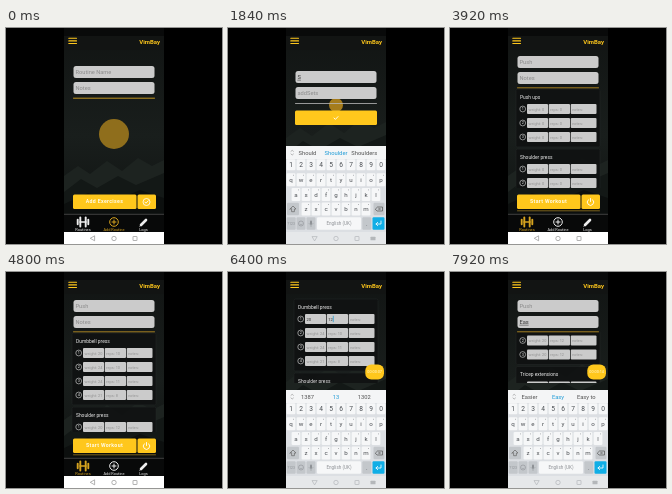
An HTML page that plays this animation: 216 px wide and 216 px high, repeating every 8000 ms.

```html
<!DOCTYPE html>
<html lang="en">
<head>
<meta charset="utf-8">
<title>Workout planner</title>
<style>
html, body { margin: 0; width: 100%; height: 100%; overflow: hidden; background: #000; }
svg { display: block; width: 100vw; height: 100vh; }
text { font-family: Roboto, "DejaVu Sans", sans-serif; }
</style>
</head>
<body>
<svg viewBox="0 0 216 216" xmlns="http://www.w3.org/2000/svg">
  <defs>
    <linearGradient id="sky" x2="0" y2="1">
      <stop offset="0" stop-color="#111413"/>
      <stop offset=".5" stop-color="#191e1c"/>
      <stop offset="1" stop-color="#0d100f"/>
    </linearGradient>
    <clipPath id="phone"><rect x="58" width="100" height="216"/></clipPath>
    <clipPath id="page"><rect x="58" y="22" width="100" height="164"/></clipPath>
    <clipPath id="list"><rect x="58" y="60" width="100" height="100"/></clipPath>
    <clipPath id="shortList"><rect x="58" y="60" width="100" height="51"/></clipPath>
    <clipPath id="raisedList"><rect x="58" y="26" width="100" height="85"/></clipPath>
  </defs>
  <g id="stage" clip-path="url(#phone)"></g>
</svg>
<script>
const LOOP = 8000, STEP = 80;
const GOLD = '#ffc71c', DARK = '#333', BRAND = 'VimBay';
const KEY = '#f6f7f8', SIDE_KEY = '#c3c7cb', BOARD = '#dcdfe3', KEY_INK = '#4a4e52';
const stage = document.getElementById('stage');

const rect = (x, y, w, h, fill, r = 0, more = '') =>
  `<rect x="${x}" y="${y}" width="${w}" height="${h}" rx="${r}" fill="${fill}" ${more}/>`;
const circle = (x, y, r, fill, more = '') =>
  `<circle cx="${x}" cy="${y}" r="${r}" fill="${fill}" ${more}/>`;
const line = (d, color, w = 1) =>
  `<path d="${d}" fill="none" stroke="${color}" stroke-width="${w}" stroke-linecap="round" stroke-linejoin="round"/>`;
// y is the visual middle of the text
const text = (s, x, y, size, fill, anchor = 'middle', more = '') =>
  `<text x="${x}" y="${y + size * 0.36}" font-size="${size}" fill="${fill}" text-anchor="${anchor}" ${more}>${s}</text>`;
const clip = (id, body) => `<g clip-path="url(#${id})">${body}</g>`;
const typed = (s, t, start, perChar) =>
  s.slice(0, Math.max(0, Math.floor((t - start) / perChar) + 1));
const ease = (t, a, b) => {
  const p = Math.min(1, Math.max(0, (t - a) / (b - a)));
  return p * p * (3 - 2 * p);
};
const touch = (x, y) => circle(x, y, 3, '#fff', 'opacity=".65"');

function backdrop(keyboard) {
  const k = keyboard ? -38 : 0;
  return rect(58, 0, 100, 216, 'url(#sky)') +
    `<g transform="translate(0 ${k})">
      <path d="M58 148L72 138 84 146 101 133 116 143 132 130 146 138 158 132V216H58Z" fill="#1d2320"/>
      <path d="M58 164L75 151 91 160 112 148 130 157 158 145V216H58Z" fill="#131816"/>
      <path d="M58 176L82 165 108 173 134 162 158 170V216H58Z" fill="#0c0f0e"/>
    </g>`;
}

function header() {
  return rect(58, 0, 100, 22, '#121413') + rect(58, 0, 100, 8, '#090a0a') +
    [10.3, 12.9, 15.5].map(y => line(`M62.8 ${y}H70.5`, GOLD, 1.1)).join('') +
    text(BRAND, 154, 13.4, 6, GOLD, 'end', 'font-weight="700"');
}

function field(y, value, hint, focus) {
  const width = value.length * 2.85;
  return rect(67.5, y, 81, 12, '#cbcbcb', 2.5) +
    text(value || hint, 69.5, y + 6.2, 5.7, value ? DARK : '#8b8b8b', 'start') +
    (focus && value ? line(`M69.7 ${y + 9.2}h${width}`, DARK, 0.5) : '');
}

const check = (x, y, s, color) =>
  line(`M${x - s} ${y}l${s * 0.7} ${s * 0.7} ${s * 1.3} ${-s * 1.4}`, color, 0.9);

function dumbbell(x, y, color) {
  const plates = [[-5.3, 2.2], [-2.7, 4.6], [2.7, 4.6], [5.3, 2.2]];
  return line(`M${x - 3} ${y}h6`, color, 1.6) +
    plates.map(([dx, h]) => line(`M${x + dx} ${y - h}v${h * 2}`, color, 1.9)).join('');
}

function tabs(active) {
  const tone = i => i === active ? '#d6a31f' : '#eee';
  const mid = tone(1);
  return rect(58, 186, 100, 18, '#080909') + line('M58 186.3H158', '#777', 0.5) +
    dumbbell(77, 194, tone(0)) + text('Routines', 77, 201.3, 4, tone(0)) +
    circle(108, 194, 4.3, 'none', `stroke="${mid}" stroke-width="1"`) +
    line('M106 194h4M108 192v4', mid, 1) +
    text('Add Routine', 108, 201.3, 3.9, mid) +
    line('M135 197L140 192', '#eee', 2.6) + line('M134 198.2l1-1', '#eee', 1) +
    text('Logs', 137.5, 201.3, 4, '#eee');
}

function navbar(keyboard) {
  const ink = keyboard ? '#b4b7ba' : '#929292';
  return rect(58, 204, 100, 12, keyboard ? '#e6e8ea' : '#fff') +
    (keyboard
      ? line('M84.4 208.6h4.8l-2.4 4Z', ink, 0.7)
      : line('M88.6 208.2v4.6l-4-2.3Z', ink, 0.7)) +
    circle(108, 210.5, 2.2, 'none', `stroke="${ink}" stroke-width=".7"`) +
    rect(127, 208.5, 4, 4, 'none', 0.3, `stroke="${ink}" stroke-width=".7"`) +
    (keyboard ? rect(142.5, 208.8, 5, 3.4, ink, 0.5) : '');
}

function actionBar(label, power) {
  const icon = power
    ? line('M138.3 171.8a3.2 3.2 0 1 0 4.4 0M140.5 170.5v3', '#fff', 0.9)
    : circle(140.5, 174, 3.5, 'none', 'stroke="#fff" stroke-width=".8"') + check(140.5, 174, 1.7, '#fff');
  return rect(67, 166.5, 63.5, 14.5, GOLD, 1.5) + rect(131.5, 166.5, 18.5, 14.5, GOLD, 1.5) +
    text(label, 98.5, 173.6, 5.2, '#fffbe8', 'middle', 'font-weight="700" letter-spacing=".35"') + icon;
}

const key = (x, y, w, h, label, size = 6, fill = KEY, ink = KEY_INK) =>
  rect(x - w / 2, y - h / 2, w, h, fill, 1.2) + text(label, x, y, size, ink);

function enterKey(y) {
  return rect(144.5, y - 6.3, 12, 12.6, '#10aee6', 1.2) +
    line(`M153 ${y - 2.5}v3h-5m1.7-1.7l-1.7 1.7 1.7 1.7`, '#fff', 0.8);
}

function backspace(x, y) {
  return rect(x - 5.5, y - 6.2, 11, 12.4, SIDE_KEY, 1.2) +
    line(`M${x - 3.5} ${y}l2-2h5v4h-5Z`, '#555', 0.7) +
    line(`M${x - 0.3} ${y - 0.8}l1.6 1.6m0-1.6l-1.6 1.6`, '#555', 0.6);
}

function symbolBoard() {
  const xs = [64.5, 75.5, 84, 92.5, 101.5, 113, 126, 139, 151.5];
  const rows = ['# £ &amp; _ - 1 2 3 ?', '@ ( ) = + 4 5 6 !', '{&amp;= \' " : % 7 8 9'];
  const widthOf = i => i === 0 ? 11.5 : i < 5 ? 7.8 : i < 8 ? 12 : 11;
  let out = rect(58, 143, 100, 61, BOARD);
  rows.forEach((row, r) => row.split(' ').forEach((k, i) => {
    const side = r === 2 && i === 0;
    out += key(xs[i], 150.5 + r * 15, widthOf(i), 13.4, k, side ? 4 : 6, side ? SIDE_KEY : KEY);
  }));
  out += backspace(151.2, 180.5) + key(64.5, 195.5, 11.5, 13.4, 'ABC', 4, SIDE_KEY) +
    key(75.5, 195.5, 7.8, 13.4, '\'') + key(88.5, 195.5, 16, 13.4, '') +
    line('M84.5 194.5v2h8v-2', '#555', 0.7);
  ['*', ',', '0', '.'].forEach((k, i) => {
    out += key(xs[i + 4], 195.5, widthOf(i + 4), 13.4, k);
  });
  return out + enterKey(195.5);
}

function letterBoard(words) {
  const soft = '#8d9195';
  let out = rect(58, 118, 100, 86, BOARD) + rect(58, 118, 100, 13, '#f4f5f6') +
    line('M63 123.3l1.2-1 1.2 1M63 126l1.2 1 1.2-1', '#888', 0.6);
  words.forEach((w, i) => {
    out += text(w, [79.5, 108, 136.3][i], 124.7, 5.8, i === 1 ? '#1c9ad6' : '#505050');
  });
  const rows = [['1234567890', 63, 136.8], ['qwertyuiop', 63, 151.8], ['asdfghjkl', 68, 166.4], ['zxcvbnm', 78, 181]];
  rows.forEach(([keys, x, y], r) => [...keys].forEach((k, i) => {
    out += key(x + i * 10, y, 8.8, r ? 13 : 11, k, r ? 6.2 : 6.6);
    if (r) out += rect(x + i * 10 + 2, y - 5, 1, 1, '#b2b5b8');
  }));
  out += rect(59, 174.8, 12, 12.4, SIDE_KEY, 1.2) +
    line('M62 181l3-3 3 3h-1.6v2.7h-2.8v-2.7Z', '#666', 0.7) + backspace(151, 181) +
    key(63.2, 195.5, 9, 12.6, '?123', 3.4, SIDE_KEY, soft) + key(73, 195.5, 9, 12.6, '', 6, SIDE_KEY) +
    circle(73, 195.5, 2.5, 'none', `stroke="${soft}" stroke-width=".6"`) +
    line('M71.8 196.2q1.2 1.2 2.4 0', soft, 0.5) +
    key(83, 195.5, 9, 12.6, '', 6, SIDE_KEY) + rect(82, 192.5, 2, 4, soft, 1) +
    line('M81 195.5q2 3 4 0M83 197v1.5', soft, 0.5) +
    key(111, 195.5, 44, 12.6, 'English (UK)', 4.6, KEY, soft) +
    key(138.8, 195.5, 9, 12.6, '.', 6, SIDE_KEY);
  return out + enterKey(195.5);
}

const wordsFor = s =>
  /^\d/.test(s) ? ['1387', '13', '1302'] :
  /^E/.test(s) ? ['Easier', 'Easy', 'Easy to'] :
  /^S/.test(s) ? ['Should', 'Shoulder', 'Shoulders'] :
  /^P/.test(s) ? ['Pushed', 'Push', 'Push up'] : ['I', 'The', 'Thanks'];

const frame = (body, keys, tab) =>
  backdrop(!!keys) + clip('page', body) + header() + (keys || tabs(tab)) + navbar(!!keys);

const mark = y => circle(108, y, 15, '#a57c1c', 'opacity=".85"');

function routineForm({ name = '', keys, exercises = [], tap = '' }) {
  const cards = exercises.map((e, i) => card(74 + i * 60, e, blank(3))).join('');
  return frame(
    (keys ? '' : mark(106)) + field(38, name, 'Routine Name', !!keys) + field(54, '', 'Notes') +
    line('M67.5 70.2H148.5', '#d3a224', 0.9) + clip('list', cards) +
    (keys ? '' : actionBar('Add Exercises', false)) + tap, keys, 1);
}

function exerciseForm({ name, sets = '', keys, onSets, tap = '' }) {
  return frame(
    circle(108, 77, 7, '#a57c1c') + line('M67.5 75.5H148.5', '#b9b9b9', 0.8) +
    field(43, name, 'Exercise Name', !onSets) + field(59, sets, 'addSets', onSets) +
    (sets ? rect(69.5, 61.5, 4.5, 7, '#2b9fd0', 0, 'opacity=".4"') : '') +
    rect(67, 82.5, 82, 14.5, GOLD, 1.5) + check(108, 90, 2, '#fff') + tap, keys);
}

// each row holds [weight, reps, typedWeight, typedReps]
function card(y, title, rows) {
  const cell = (x, w, cy, hint, value) =>
    rect(x, cy - 5, w, 10, '#cbcbcb', 1) +
    text(value || hint, x + 1.5, cy + 0.2, value ? 4.2 : 3.9, value ? DARK : '#939393', 'start');
  return rect(66, y, 84, rows.length * 14 + 16, '#101212', 1.5, 'opacity=".92" stroke="#262928" stroke-width=".5"') +
    text(title, 70, y + 8, 4.9, '#eee', 'start') +
    rows.map(([weight, reps, w, r], i) => {
      const cy = y + 20 + 14 * i;
      return circle(72.7, cy, 2.9, 'none', 'stroke="#ddd" stroke-width=".6"') +
        text(i + 1, 72.7, cy, 3.8, '#eee') +
        cell(77, 21, cy, 'weight: ' + weight, w) +
        cell(98.7, 21.3, cy, 'reps: ' + reps, r) +
        cell(120.7, 25.8, cy, 'notes:', '');
    }).join('');
}

function stack(y, groups) {
  return groups.map(([title, rows]) => {
    const out = card(y, title, rows);
    y += rows.length * 14 + 18;
    return out;
  }).join('');
}

function workout({ groups, scroll = 0, raised, note = '', noteFocus, keys, clock, cursor = '', tap = '' }) {
  const area = raised ? 'raisedList' : keys ? 'shortList' : 'list';
  const fabY = keys ? 92.5 : 148;
  const fields = field(28, '', 'Push') + field(44, note, 'Notes', noteFocus) +
    line('M67.5 59.8H148.5', '#c79722', 0.8);
  return frame(
    clip(area, stack((raised ? 27 : 61) - scroll, groups) + cursor) +
    (raised ? '' : fields) +
    (keys ? '' : actionBar(clock ? 'End Workout' : 'Start Workout', true) +
      line('M67.5 182.8H149.5', '#c79722', 0.6)) +
    (clock ? rect(137.3, fabY, 18.7, 15, GOLD, 6) + text(clock, 146.7, fabY + 7.5, 3.8, '#fff8dc') : '') +
    tap, keys, 0);
}

const blank = n => Array.from({ length: n }, () => [0, 0]);
const newPlan = [['Push ups', blank(3)], ['Shoulder press', blank(3)]];

function pressPlan(t) {
  const rows = [[20, 10], [24, 10], [24, 11], [21, 8]];
  rows[0].push(typed('20', t, 5440, 240), typed('12', t, 6240, 80));
  rows[1].push(typed('24', t, 6720, 80), typed('10', t, 6960, 80));
  const same = (weight, reps) => Array.from({ length: 3 }, () => [weight, reps]);
  return [['Dumbbell press', rows], ['Shoulder press', same(20, 12)], ['Tricep extensions', same(15, 12)]];
}

function scene(t) {
  if (t < 160) return routineForm({});
  if (t < 480) {
    const name = typed('Push', t, 240, 64);
    return routineForm({ name, keys: letterBoard(wordsFor(name)) });
  }
  if (t < 560) return routineForm({ name: 'Push', tap: touch(98, 174) });
  if (t < 1040) {
    const name = typed('Push ups', t, 600, 50);
    return exerciseForm({ name, keys: letterBoard(wordsFor(name)) });
  }
  if (t < 1360) return exerciseForm({
    name: 'Push ups', sets: t < 1120 ? '' : '3', onSets: true, keys: symbolBoard(),
    tap: t >= 1120 && t < 1280 ? touch(81, 87) : ''
  });
  if (t < 1600) return routineForm({ name: 'Push', exercises: ['Push ups'], tap: t >= 1520 ? touch(98, 174) : '' });
  if (t < 2720) {
    const name = typed('Shoulder press', t, 1800, 58);
    return exerciseForm({ name, keys: letterBoard(wordsFor(name)) });
  }
  if (t < 3280) return exerciseForm({
    name: 'Shoulder press', sets: t < 3040 ? '' : '3', onSets: true, keys: symbolBoard(),
    tap: t >= 3200 ? touch(108, 90) : ''
  });
  if (t < 3520) return routineForm({
    name: 'Push', exercises: ['Push ups', 'Shoulder press'], tap: t >= 3440 ? touch(140, 174) : ''
  });
  if (t < 4480) return workout({ groups: newPlan, scroll: 20 * ease(t, 4000, 4320) });

  const groups = pressPlan(t);
  const seconds = String(Math.floor((t - 4960) / 200)).padStart(2, '0');
  const clock = t < 4960 ? '' : '00:00:' + seconds;
  if (t < 5200) return workout({ groups, clock, tap: t >= 4880 && t < 4960 ? touch(98, 174) : '' });
  if (t < 7120) {
    const row = groups[0][1][t < 6640 ? 0 : 1];
    const onReps = (t >= 6160 && t < 6640) || t >= 6880;
    const value = row[onReps ? 3 : 2];
    const x = (onReps ? 100.5 : 78.8) + value.length * 2.4;
    const y = t < 6640 ? 47 : 61;
    const cursor = line(`M${x} ${y - 2.8}v5.6`, '#2b9fd0', 0.8);
    return workout({ groups, raised: true, clock, cursor, keys: letterBoard(wordsFor(value)) });
  }
  const scroll = 100.5 * ease(t, 7120, 7520);
  if (t < 7600) return workout({ groups, scroll, clock, tap: t >= 7520 ? touch(100, 50) : '' });
  const note = typed('Eas', t, 7680, 80);
  return workout({ groups, scroll, clock, note, noteFocus: true, keys: letterBoard(wordsFor(note)) });
}

let shown = -1;
function tick() {
  const t = Math.floor((performance.now() % LOOP) / STEP) * STEP;
  if (t !== shown) {
    shown = t;
    stage.innerHTML = scene(t);
  }
  requestAnimationFrame(tick);
}
tick();
</script>
</body>
</html>
```
